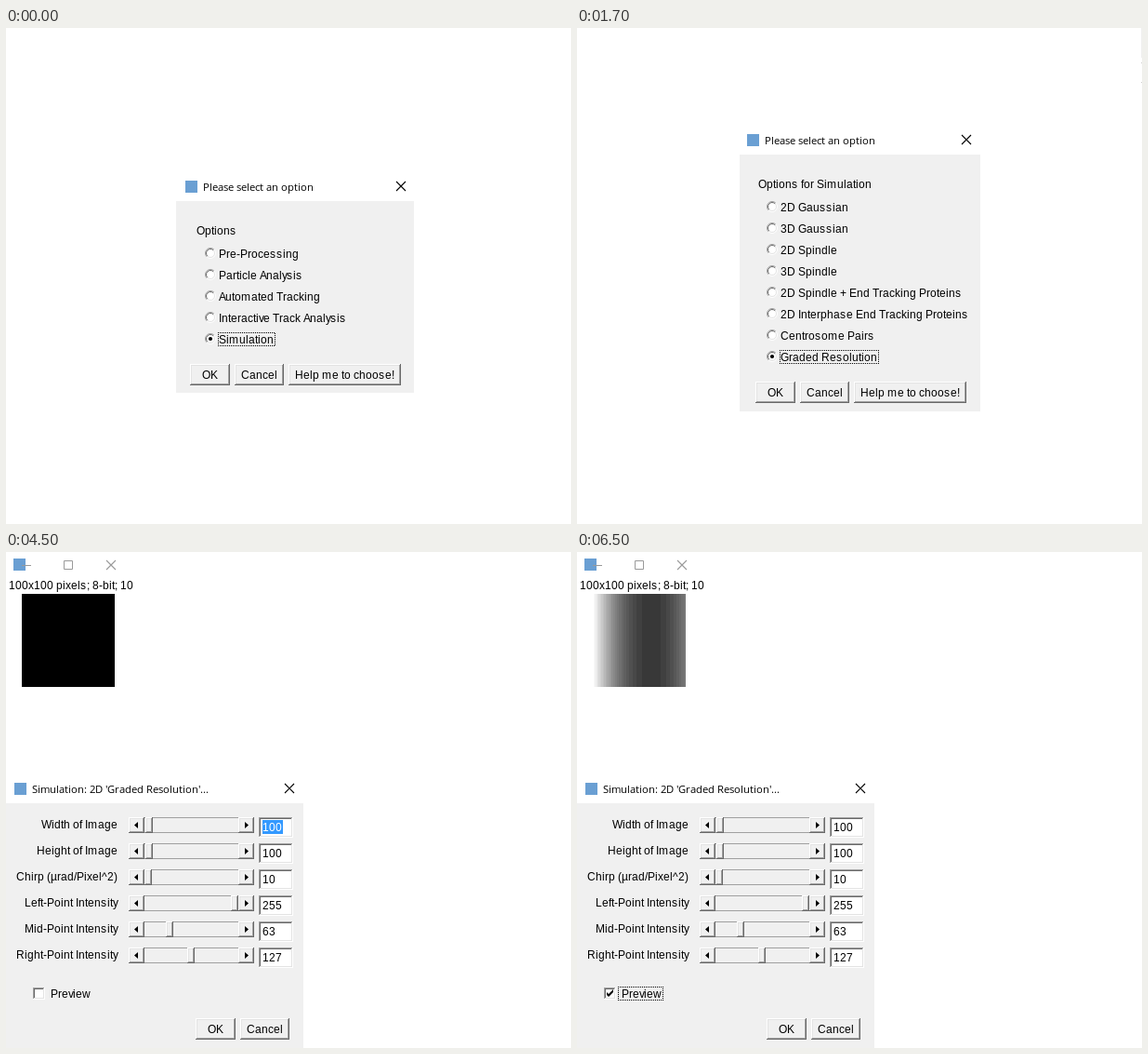
Recreate the animation shown at these times as an HTML page. Size 608 px wide and 533 px high, loop 8000 ms.

```html
<!DOCTYPE html>
<html lang="en">
<head>
<meta charset="utf-8">
<title>Simulation dialogs</title>
<style>
  html, body { margin: 0; width: 100%; height: 100%; overflow: hidden; background: #fff; }
  svg { display: block; width: 608px; height: 533px; }
  text { white-space: pre; }
  .scene { visibility: hidden; }
  .scene.on { visibility: visible; }
</style>
</head>
<body>
<svg id="stage" viewBox="0 0 608 533"></svg>
<script>
const LOOP = 8000;
const FACE = '#f0f0f0', BLUE = '#6a9fd3', SELECT = '#3399ff';
const UI = '12px "Liberation Sans", Arial, sans-serif';
const TITLE = '500 11.25px "Open Sans", "Noto Sans", sans-serif';
const stage = document.getElementById('stage');
const pen = document.createElement('canvas').getContext('2d');
let layer = stage;

function add(tag, attrs, content) {
  const el = document.createElementNS('http://www.w3.org/2000/svg', tag);
  for (const key in attrs) el.setAttribute(key, attrs[key]);
  if (content !== undefined) el.textContent = content;
  return layer.appendChild(el);
}

const rect = (x, y, width, height, fill) =>
  add('rect', { x, y, width, height, fill, 'shape-rendering': 'crispEdges' });
const path = (d, stroke, width = 1, fill = 'none') =>
  add('path', { d, stroke, 'stroke-width': width, fill });

// Whole-pixel advances, as in classic hinted interface text
const hinted = { A: 7, m: 11, s: 7, v: 5, y: 5 };
function advance(c, font = UI) {
  if (font === UI && hinted[c]) return hinted[c];
  pen.font = font;
  return Math.round(pen.measureText(c).width);
}
const textWidth = s => [...s].reduce((sum, c) => sum + advance(c), 0);

function label(s, x, y, fill = '#000', font = UI) {
  let at = x;
  const xs = [...s].map(c => { const p = at; at += advance(c, font); return p; });
  add('text', { x: xs.join(' '), y, fill }, s).style.font = font;
}

function bevel(x, y, w, h, fill, [outerTL, innerTL, innerBR, outerBR]) {
  rect(x, y, w, h, outerBR);
  rect(x, y, w - 1, h - 1, outerTL);
  rect(x + 1, y + 1, w - 2, h - 2, innerBR);
  rect(x + 1, y + 1, w - 3, h - 3, innerTL);
  rect(x + 2, y + 2, w - 4, h - 4, fill);
}
const raised = (x, y, w, h) =>
  bevel(x, y, w, h, FACE, ['#fff', '#e3e3e3', '#a0a0a0', '#696969']);
const sunken = (x, y, w, h) =>
  bevel(x, y, w, h, '#fff', ['#a0a0a0', '#696969', '#e3e3e3', '#fff']);

function cross(x, y, color = '#000') {
  path(`M${x - 5} ${y - 5}l10 10m0 -10l-10 10`, color, 1.1);
}

function titleBar(s, x, y, closeX) {
  rect(x - 19, y - 11, 13, 13, BLUE);
  label(s, x, y, '#000', TITLE);
  cross(closeX, y - 5);
}

function button(s, x, y, w) {
  raised(x, y, w, 23);
  label(s, Math.floor(x + (w - textWidth(s)) / 2), y + 16);
}

function buttons(x, y, help) {
  button('OK', x, y, 43);
  button('Cancel', x + 48, y, 53);
  if (help) button('Help me to choose!', x + 106, y, 121);
}

function focusBox(x, y, w, h) {
  add('rect', {
    x: x + .5, y: y + .5, width: w - 1, height: h - 1, fill: 'none',
    stroke: '#000', 'stroke-dasharray': '1 1', 'stroke-dashoffset': .5,
    'shape-rendering': 'crispEdges'
  });
}

function radio(x, y, on) {
  const half = (r, sweep) => {
    const k = r * Math.SQRT1_2;
    return `M${x - k} ${y + k}A${r} ${r} 0 0 ${sweep} ${x + k} ${y - k}`;
  };
  add('circle', { cx: x, cy: y, r: 5, fill: '#fff' });
  path(half(5.5, 1), '#a0a0a0');
  path(half(5.5, 0), '#fff');
  path(half(4.5, 1), '#696969');
  path(half(4.5, 0), '#e3e3e3');
  if (on) add('circle', { cx: x, cy: y, r: 2.1, fill: '#000' });
}

// The last option is the chosen one
function options(names, x, y) {
  names.forEach((name, i) => {
    const base = y + i * 23, on = i === names.length - 1;
    radio(x - 9, base - 5, on);
    label(name, x, base);
    if (on) focusBox(x - 1, base - 12, textWidth(name) + 3, 15);
  });
}

function field(value, x, y, w, h, selected) {
  sunken(x, y, w, h);
  if (selected) rect(x + 4, y + 3, 22, 15, SELECT);
  label(value, x + 4, y + 15, selected ? '#fff' : '#000');
}

function slider(name, value, thumb, y, selected) {
  label(name, 120 - textWidth(name), y + 12);
  rect(148, y, 104, 17, '#a0a0a0');
  rect(149, y + 1, 102, 15, FACE);
  raised(132, y, 17, 17);
  raised(250, y, 17, 17);
  path(`M142 ${y + 5}v7l-4 -3.5zM257 ${y + 5}v7l4 -3.5z`, 'none', 0, '#000');
  raised(thumb, y, 8, 17);
  field(value, 272, y, 37, 22, selected);
}

// Parabola through the left, middle and right intensities
function gradient(x, y, size, left, mid, right) {
  const c = 2 * (left + right - 2 * mid), b = right - left - c;
  for (let i = 0; i < size; i++) {
    const u = i / size;
    const v = Math.min(255, Math.round((left + b * u + c * u * u) / 8) * 8);
    rect(x + i, y, 1, size, `rgb(${v},${v},${v})`);
  }
}

function imageWindow() {
  rect(8, 7, 13, 13, BLUE);
  rect(17, 14, 10, 1, '#999');
  path('M62.5 9.5h9v9h-9z', '#999');
  cross(113, 14, '#999');
  label('100x100 pixels; 8-bit; 10', 3, 40);
}

const sliders = [
  ['Width of Image', '100', 150],
  ['Height of Image', '100', 150],
  ['Chirp (µrad/Pixel^2)', '10', 149],
  ['Left-Point Intensity', '255', 242],
  ['Mid-Point Intensity', '63', 172],
  ['Right-Point Intensity', '127', 195]
];

function settings(preview) {
  imageWindow();
  if (preview) gradient(17, 45, 100, 255, 63, 127);
  else rect(17, 45, 100, 100, '#000');
  titleBar("Simulation: 2D 'Graded Resolution'...", 28, 259, 305);
  rect(0, 270, 320, 263, FACE);
  sliders.forEach(([name, value, thumb], i) =>
    slider(name, value, thumb, 285 + i * 28, i === 0 && !preview));
  sunken(29, 468, 13, 13);
  label('Preview', 48, 479);
  if (preview) {
    path('M32 473v3l2 2l5 -5v-3l-5 5z', 'none', 0, '#000');
    focusBox(44, 467, 49, 15);
  }
  buttons(204, 501);
}

function mainMenu() {
  titleBar('Please select an option', 212, 175, 425);
  rect(183, 186, 256, 206, FACE);
  label('Options', 205, 222);
  options(['Pre-Processing', 'Particle Analysis', 'Automated Tracking',
    'Interactive Track Analysis', 'Simulation'], 229, 247);
  buttons(198, 361, true);
}

function simulationMenu() {
  rect(607, 0, 1, 32, '#f0f0f0');
  rect(607, 37, 1, 1, '#d0d0d0');
  rect(607, 58, 1, 1, '#d0d0d0');
  titleBar('Please select an option', 202, 125, 419);
  rect(175, 136, 259, 276, FACE);
  label('Options for Simulation', 195, 172);
  options(['2D Gaussian', '3D Gaussian', '2D Spindle', '3D Spindle',
    '2D Spindle + End Tracking Proteins', '2D Interphase End Tracking Proteins',
    'Centrosome Pairs', 'Graded Resolution'], 219, 197);
  buttons(192, 380, true);
}

function sizeDialog() {
  titleBar('Image Para...', 260, 210, 347);
  rect(233, 221, 129, 115, FACE);
  label('Nx', 243, 252);
  label('Ny', 243, 278);
  field('100', 269, 236, 52, 23, true);
  rect(294, 239, 1, 15, '#cc6600');
  field('100', 269, 262, 52, 23);
  buttons(246, 303);
}

const scenes = [
  [0, mainMenu],
  [500, simulationMenu],
  [2500, sizeDialog],
  [4500, () => settings(false)],
  [6500, () => settings(true)]
].map(([start, draw]) => {
  layer = stage;
  const group = layer = add('g', { class: 'scene' });
  draw();
  return { start, group };
});

function show() {
  const t = performance.now() % LOOP;
  const now = scenes.filter(s => s.start <= t).pop();
  scenes.forEach(s => s.group.classList.toggle('on', s === now));
  requestAnimationFrame(show);
}
show();
</script>
</body>
</html>
```
